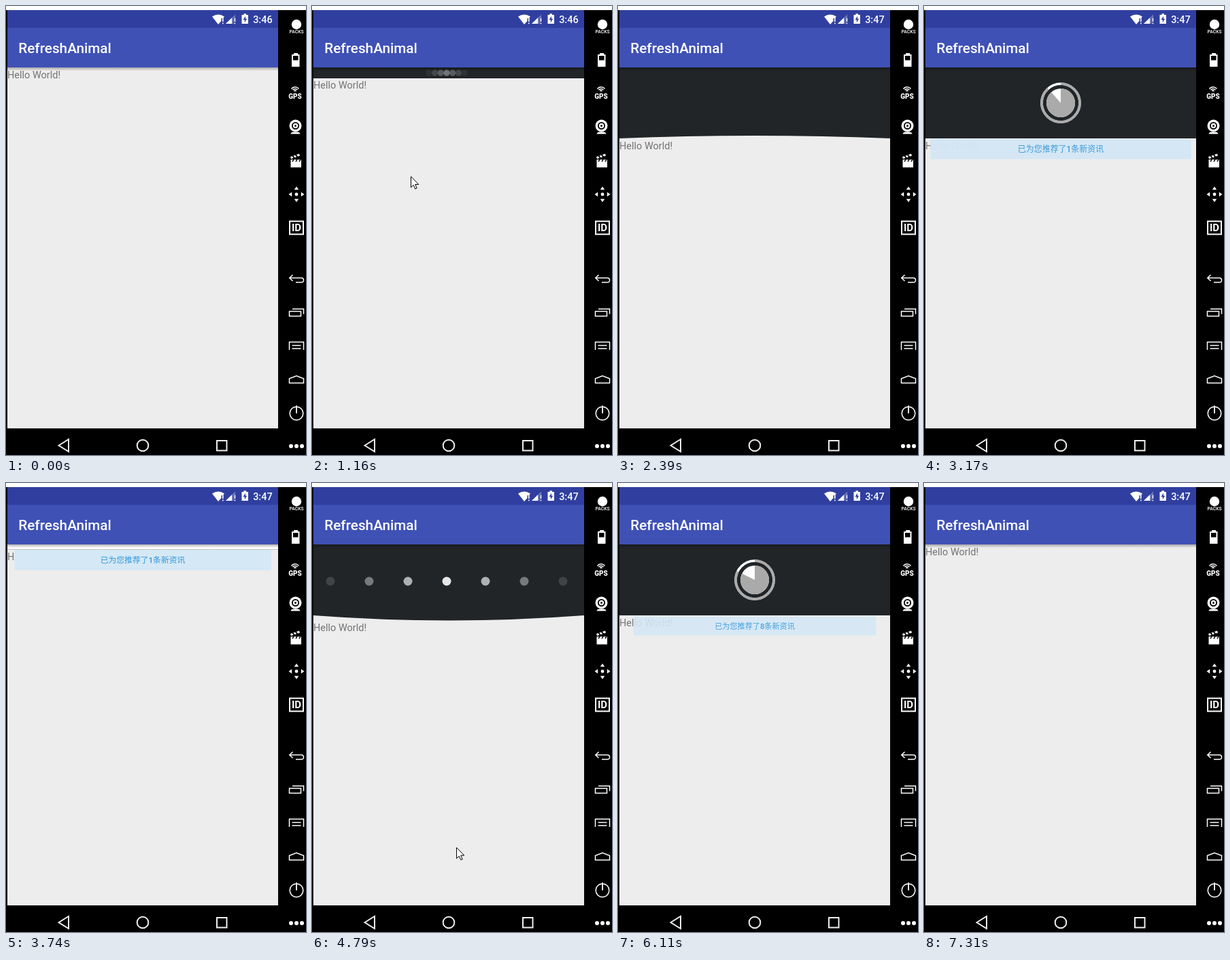
Animation of 441 by 658 pixels, one loop 7.46 s. Source, as an HTML page with a canvas:

```html
<!DOCTYPE html>
<html lang="en">
<head>
<meta charset="utf-8">
<title>Pull to refresh</title>
<style>
html, body { margin: 0; width: 100%; height: 100%; overflow: hidden; background: #fff; }
canvas { display: block; width: 441px; height: 658px; }
</style>
</head>
<body>
<canvas id="stage" width="441" height="658"></canvas>
<script>
const ctx = document.getElementById('stage').getContext('2d');
const LOOP = 7460, TOP = 90, HEAD = 104, MID = 201, TURN = Math.PI * 2;
const SANS = 'Roboto, sans-serif';

// The screen refreshes in bursts: every 120 ms inside one, 150 ms after it.
const bursts = [1, 5, 2, 1, 3, 2, 2, 2, 3, 2, 1, 3, 2, 2, 2, 2, 4, 1, 3, 2, 4, 2, 1];
const ticks = [0];
let tick = 530;
for (const n of bursts) {
  for (let i = 1; i <= n; i++) {
    ticks.push(tick);
    tick += i < n ? 120 : 150;
  }
}

// Each refresh: press, release, loading done, header folds away.
const cycles = [
  { end: 4100, press: 1000, release: 2170, done: 3280, fold: 3595, count: 1, pointer: firstDrag },
  { end: LOOP, press: 4520, release: 5190, done: 6360, fold: 6590, count: 8, pointer: secondDrag }
];

const span = (t, from, length) => Math.max(0, Math.min(1, (t - from) / length));
const easeOut = u => 1 - (1 - u) ** 2;
const smooth = u => u * u * (3 - 2 * u);

function firstDrag(t) {
  if (t < 530 || t >= 2165) return null;
  return {
    x: 219 - 74 * smooth(span(t, 530, 630)) + 45 * smooth(span(t, 1160, 540)),
    y: 210 + 325 * smooth(span(t, 1010, 690))
  };
}

function secondDrag(t) {
  if (t >= 7100 && t < 7300) return { x: 427, y: 638 };
  if (t < 4130 || t >= 5190) return null;
  const enter = 1 - (1 - span(t, 4130, 390)) ** 3;
  const swing = Math.max(0, t - 4520) / 410;
  return {
    x: 428 - 205 * enter - 11 * span(t, 4520, 270),
    y: 330 - 202 * enter + 472 * Math.sin(swing * TURN / 4)
  };
}

function pullHeight(t, c) {
  if (t < c.press) return 0;
  if (t < c.release) {
    const p = c.pointer(t);
    return p ? .336 * Math.max(0, p.y - 202) : HEAD;
  }
  const settle = 10 * (1 - easeOut(span(t, c.release, 90)));
  return (HEAD + settle) * (1 - span(t, c.fold, 300)) ** 4;
}

function rect(x, y, w, h, fill) { ctx.fillStyle = fill; ctx.fillRect(x, y, w, h); }

function disc(x, y, r, fill) {
  ctx.beginPath(); ctx.arc(x, y, r, 0, TURN);
  ctx.fillStyle = fill; ctx.fill();
}

function ring(x, y, r, width, color = '#fff', from = 0, to = TURN) {
  ctx.beginPath(); ctx.arc(x, y, r, from, to);
  ctx.lineWidth = width; ctx.strokeStyle = color; ctx.stroke();
}

function shape(d, fill) { ctx.fillStyle = fill; ctx.fill(new Path2D(d)); }

function line(d, width = 1.5, color = '#fff') {
  ctx.lineWidth = width; ctx.strokeStyle = color; ctx.stroke(new Path2D(d));
}

function label(s, x, y, font, fill, align = 'left') {
  ctx.font = font; ctx.fillStyle = fill; ctx.textAlign = align;
  ctx.fillText(s, x, y);
}

function statusBar(t) {
  rect(2, 6, 398, 26, '#303f9f');
  shape('M303 15.5Q312 9.5 321 15.5L319 18H316.5V22L312 27Z', '#fff');
  shape('M323 26L337 12.5V17H334.5V26Z', 'rgba(255,255,255,.3)');
  shape('M323 26L332 17.3V26Z', '#fff');
  for (const x of [318, 335.6]) {
    rect(x, 17.5, 1.6, 5.5, '#fff');
    rect(x, 24.5, 1.6, 1.8, '#fff');
  }
  shape('M346.5 13H349.5V11.3H353V13H356V26H346.5Z', '#fff');
  shape('M352 14.8L348.5 20.2H350.8V24.2L354.2 18.8H352Z', '#303f9f');
  label(t < 1850 ? '3:46' : '3:47', 391.7, 25, '500 14.5px ' + SANS, '#fff', 'right');
}

function toolbar() {
  const shade = ctx.createLinearGradient(0, TOP, 0, TOP + 5);
  shade.addColorStop(0, 'rgba(0,0,0,.3)');
  shade.addColorStop(1, 'rgba(0,0,0,0)');
  rect(2, TOP, 398, 5, shade);
  rect(2, 32, 398, 58, '#3f51b5');
  label('RefreshAnimal', 18.2, 69.2, '500 20.75px ' + SANS, '#fff');
}

function navBar() {
  line('M77.5 644L92 635V653Z', 2, '#eee');
  ring(MID, 644, 8.3, 2, '#eee');
  line('M310 637H324.5V651.5H310Z', 2, '#eee');
}

function sidebar() {
  disc(427, 27, 7.2, '#fff');
  label('PACKS', 427, 40.3, '500 6.8px ' + SANS, '#fff', 'center');

  shape('M420 71H423V69H429V71H431.5V89H420Z', '#fff');
  rect(422, 73, 7.5, 6.5, '#000');

  for (const r of [2, 4.6, 7.2]) ring(425, 126, r, 1.5, '#fff', -2.45, -.7);
  label('GPS', 425, 136, '900 10px ' + SANS, '#fff', 'center');

  disc(425.5, 175.5, 9, '#fff');
  ring(425.5, 175.5, 4.6, 1.8, '#000');
  disc(425.5, 175.5, 1.5, '#000');
  shape('M418.5 187.5Q419 184 425.5 184.5Q432 184 432.5 187.5Z', '#fff');

  rect(418.5, 225, 15.5, 11.5, '#fff');
  shape('M418 221L431 216.5L432 219.5L419 224Z', '#fff');
  line('M421 219L424 223M425.5 217.5L428.5 221.5', 2, '#000');
  line('M421 228L423 225M426 228L428 225M431 228L433 225', 1.4, '#000');

  disc(427, 276, 2.4, '#fff');
  for (let i = 0; i < 4; i++) {
    ctx.save();
    ctx.translate(427, 276); ctx.rotate(i * TURN / 4);
    shape('M0 -11.5L3.2 -6.8H-3.2Z', '#fff');
    ctx.restore();
  }

  line('M417 315.5H437V334.5H417Z', 2);
  label('ID', 427, 330.3, '700 15px ' + SANS, '#fff', 'center');

  line('M421.5 394L416.8 398.5L421.5 403M417 398.5H434Q437.5 398.5 437.5 401.8T434 405H426');
  line('M416.5 447.5H433.5V454.5H416.5ZM421 444H437.5V451.5');
  line('M416.5 504V492.5H437.5V504M420.5 497.5H433.5M420.5 502H433.5');
  line('M416.5 552.5V546L427 542L437.5 546V552.5Z');
  ring(427, 597, 9.8, 1.5);
  line('M427 585.5V597', 1.8);
  for (let i = -1; i <= 1; i++) disc(427 + 8 * i, 645, 3, '#fff');
}

function dots(h, gather) {
  const f = Math.min(1, h / HEAD), y = TOP + Math.min(h / 2, 54);
  for (let i = -3; i <= 3; i++) {
    const a = (.89 - .25 * Math.abs(i)) * (.3 + .7 * f) * gather;
    disc(198 + i * 57 * f * gather * gather, y, 4.2 + 2.3 * f, `rgba(255,255,255,${a})`);
  }
}

function spinner(scale, turn) {
  const a = -TURN / 4, b = a + turn * TURN;
  ctx.save();
  ctx.translate(MID, 142); ctx.scale(scale, scale);
  disc(0, 0, 21, '#fff');
  ctx.beginPath(); ctx.moveTo(0, 0); ctx.arc(0, 0, 21, a, b); ctx.closePath();
  ctx.fillStyle = '#aaa'; ctx.fill();
  ring(0, 0, 28, 3.6);
  ring(0, 0, 28, 3.6, '#aaa', a, b);
  ctx.restore();
}

// How far the middle of the header's lower edge bends down.
function bend(t, h, c) {
  if (t < c.release) return Math.max(0, h - HEAD);
  const p = easeOut(span(t, c.release, 800));
  if (p < .2) return 10 * (1 - 5 * p);
  return -9 * (1 - p) * Math.abs(Math.sin((p - .2) * TURN / .8));
}

function header(t, h, c) {
  if (h <= 0) return;
  const y = TOP + Math.min(h, HEAD);
  ctx.save();
  ctx.beginPath();
  ctx.moveTo(2, TOP); ctx.lineTo(2, y);
  ctx.quadraticCurveTo(MID, y + 2 * bend(t, h, c), 400, y);
  ctx.lineTo(400, TOP); ctx.closePath();
  ctx.fillStyle = '#212528'; ctx.fill();
  ctx.clip();
  if (t < c.release + 200) {
    dots(h, 1 - span(t, c.release, 200));
  } else if (t < c.done) {
    spinner(span(t, c.release + 290, 220), easeOut(span(t, c.release + 340, 1000)));
  } else {
    disc(MID, 142, 225 * span(t, c.done, 160), '#fff');
  }
  ctx.restore();
}

function tip(t, h, c) {
  const grow = easeOut(span(t, c.release + 500, 620));
  const s = grow * (1 - span(t, c.fold - 135, 750) ** 3);
  if (s <= 0) return;
  ctx.save();
  ctx.translate(MID, TOP + h + 15.5); ctx.scale(s, s);
  ctx.globalAlpha = grow;
  rect(-199, -15.5, 398, 31, '#d5e8f5');
  label(`已为您推荐了${c.count}条新资讯`, 0, 4.5,
    '500 12.43px Roboto, "Noto Sans CJK SC", "Noto Sans CJK", sans-serif', '#3498db', 'center');
  ctx.restore();
}

function cursor(p) {
  if (!p) return;
  ctx.save();
  ctx.translate(p.x + .5, p.y + .5);
  const d = 'M0 0V16L3.7 12.5L6.3 18.2L8.7 17.1L6.2 11.6H11.3Z';
  shape(d, '#fff');
  line(d, 1, '#000');
  ctx.restore();
}

function draw(t) {
  const c = cycles.find(q => t < q.end);
  const h = pullHeight(t, c);
  rect(0, 0, 441, 6, '#fff');
  rect(0, 6, 441, 652, '#000');
  rect(2, TOP, 398, 529, '#ededed');
  header(t, h, c);
  label('Hello World!', 2, 105.5 + h, '14.5px ' + SANS, '#737373');
  tip(t, h, c);
  toolbar();
  statusBar(t);
  navBar();
  sidebar();
  cursor(c.pointer(t));
}

const begin = performance.now();
function frame() {
  const t = (performance.now() - begin) % LOOP;
  draw(ticks.filter(k => k <= t).pop());
  requestAnimationFrame(frame);
}
frame();
</script>
</body>
</html>
```
